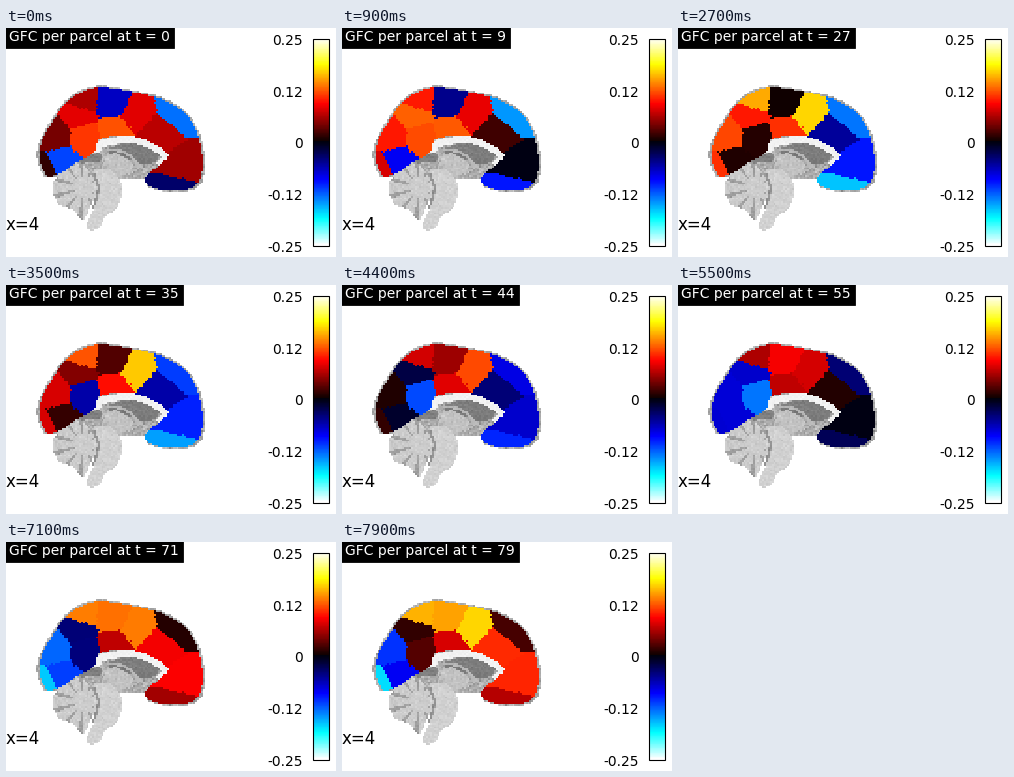
A matplotlib script that plays this animation: 330 by 229 pixels, repeating every 8 s.

```python
import numpy as np
import matplotlib.pyplot as plt
from matplotlib.animation import FuncAnimation
from matplotlib.patches import Rectangle
from matplotlib.path import Path

W, H, DPI = 330, 229, 128
FRAMES, INTERVAL = 80, 100
CELL, N = 1.87, 112  # voxel size in pixels, voxels per side
HOT = plt.get_cmap("hot")
rng = np.random.default_rng(4)

# seed x, seed y, then mean, swing, peak time and period of the signal
PARCELS = np.array([
    (50, 108, 0, .52, 20, 100),
    (56, 134, -.2, .27, 33, 70),
    (38, 143, -.12, .58, 22, 110),
    (78, 110, -.03, .52, 6, 92),
    (72, 88, .12, .43, 15, 88),
    (76, 73, .43, .2, 24, 55),
    (106, 74, .17, .6, 115, 300),
    (108, 106, .38, .12, 8, 110),
    (132, 86, .5, .2, 30, 52),
    (152, 104, .1, .34, 83, 100),
    (168, 84, -.25, .35, 84, 140),
    (178, 142, 0, .42, 79, 94),
    (174, 160, -.2, .46, 77, 100),
])


def pt(px):
    return px * 72 / DPI


def cold_hot(v):
    rgb = HOT(abs(v))[:3]
    return rgb if v >= 0 else rgb[::-1]


axis = (np.arange(N) + 0.5) * CELL
gx, gy = np.meshgrid(axis, axis)
grid = np.column_stack([gx.ravel(), gy.ravel()])
grain = rng.normal(0, 0.02, (N, N))
grey = np.ones((N, N))


def curve(points, steps=12):
    """Catmull-Rom curve through the points."""
    p = np.array([points[0], *points, points[-1]], float)
    u = np.linspace(0, 1, steps)[:, None]
    return np.vstack([
        b + u * (c - a) / 2 + u**2 * (a - 2.5 * b + 2 * c - d / 2)
        + u**3 * (-a + 3 * b - 3 * c + d) / 2
        for a, b, c, d in zip(p, p[1:], p[2:], p[3:])])


def blob(points):
    return Path(points).contains_points(grid).reshape(N, N)


def stroke(points, width):
    gap = np.linalg.norm(grid[:, None] - curve(points)[None], axis=2)
    return (gap.min(axis=1) < width / 2).reshape(N, N)


def shade(mask, level, rough=1):
    grey[mask] = np.clip(level + rough * grain, 0, 1)[mask]


# cortex: the crown without its rim and without the hollow below
crown = curve([(39, 150), (33, 140), (31, 122), (43, 96), (62, 71), (89, 59),
               (126, 63), (164, 74), (188, 95), (198, 128), (194, 157),
               (172, 165), (145, 161), (138, 151)])
hollow = curve([(38, 151), (54, 146), (72, 134), (88, 125), (94, 112),
                (122, 108), (148, 117), (162, 128), (150, 140), (138, 151)])
centre = np.array([115, 113])
cortex = blob(centre + 0.97 * (crown - centre)) & ~blob(hollow)
shade(blob(crown), 0.68, 3)

# inner parts
shade(blob(curve([(102, 121), (126, 115), (152, 127), (142, 137), (118, 131),
                  (102, 126)])), 0.49)
shade(blob(curve([(98, 130), (110, 126), (126, 137), (120, 147), (104, 148),
                  (98, 130)])), 0.76)
shade(stroke([(102, 122), (118, 125), (133, 138)], 3), 0.72)
shade(stroke([(76, 132), (92, 130)], 8), 0.5)
shade(stroke([(91, 122), (97, 116), (126, 112), (150, 121), (159, 131),
              (154, 136)], 7.5), 0.95, 0.5)

# cerebellum with fissures fanning out from its core
cerebellum = blob(curve([(56, 143), (76, 137), (90, 158), (84, 180),
                         (76, 193), (68, 183), (52, 176), (46, 158),
                         (56, 143)]))
dx, dy = gx - 78, gy - 160
fan = np.cos(11 * np.arctan2(dy, -dx))
shade(cerebellum, 0.8 - 0.17 * (fan < -0.7) * (np.hypot(dx, dy) > 10))

# brainstem
shade(blob(curve([(88, 143), (104, 143), (116, 158), (112, 178), (100, 189),
                  (93, 200), (86, 203), (80, 199), (88, 178), (88, 143)])),
      0.82)
shade(stroke([(88, 147), (92, 162), (87, 180)], 2.6), 0.58)

# each voxel belongs to the nearest seed, with ragged borders
ragged = grid + rng.uniform(-1.1, 1.1, grid.shape)
gaps = np.linalg.norm(ragged[:, None] - PARCELS[None, :, :2], axis=2)
label = gaps.argmin(axis=1).reshape(N, N)
base = np.repeat(grey[:, :, None], 3, axis=2)


def brain(t):
    mean, swing, peak, period = PARCELS[:, 2:].T
    values = mean + swing * np.cos(2 * np.pi * (t - peak) / period)
    colors = np.array([cold_hot(v) for v in values])
    img = base.copy()
    img[cortex] = colors[label[cortex]]
    return img


plt.rcParams["font.family"] = "DejaVu Sans"
fig = plt.figure(figsize=(W / DPI, H / DPI), dpi=DPI, facecolor="white")
ax = fig.add_axes([0, 0, 1, 1])
ax.axis("off")
picture = ax.imshow(brain(0), extent=(0, N * CELL, N * CELL, 0),
                    interpolation="nearest", aspect="auto")

# colour bar
left, top, wide, high = 306.5, 10.5, 16, 207
bar = np.array([[cold_hot(v)] for v in np.linspace(1, -1, 256)])
ax.imshow(bar, extent=(left, left + wide, top + high, top),
          interpolation="nearest", aspect="auto")
ax.add_patch(Rectangle((left, top), wide, high, fill=False, ec="black",
                       lw=pt(1.11)))
ax.set(xlim=(0, W), ylim=(H, 0))
for i, name in enumerate(["0.25", "0.12", "0", "-0.12", "-0.25"]):
    ax.text(left - 9.7, top + 1 + i * high / 4, name, size=pt(13.89),
            ha="right", va="center_baseline")

ax.text(0, 202, "x=4", size=pt(16.67), va="baseline")
title = ax.text(3.3, 2.3, "", size=pt(13.89), color="white", va="top",
                bbox=dict(boxstyle="square,pad=0.3", fc="black", ec="black",
                          lw=pt(0.8)))


def draw(t):
    picture.set_data(brain(t))
    title.set_text(f"GFC per parcel at t = {t}")
    return picture, title


anim = FuncAnimation(fig, draw, frames=FRAMES, interval=INTERVAL,
                     init_func=lambda: draw(0), repeat=True, repeat_delay=0)
plt.show()
```
